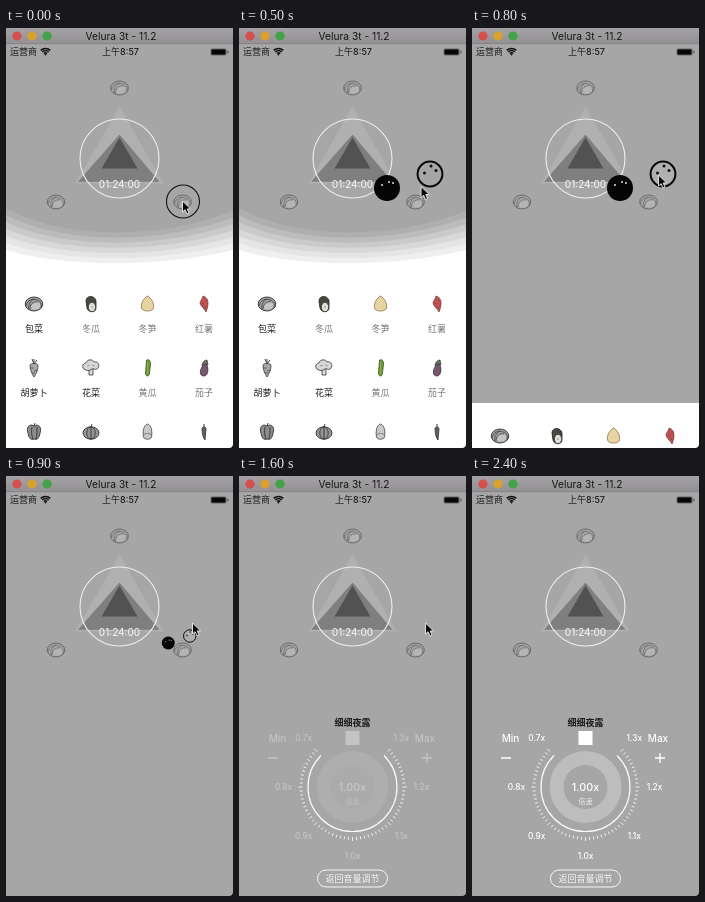
Write an HTML page with a canvas that moves like this. It is 227x420 px and loops after 2500 ms.

```html
<!DOCTYPE html>
<html lang="zh-CN">
<head>
<meta charset="utf-8">
<style>
html, body { margin: 0; width: 100%; height: 100%; overflow: hidden; background: #a6a6a6; }
canvas { display: block; width: 227px; height: 420px; }
</style>
</head>
<body>
<canvas id="stage"></canvas>
<script>
const W = 227, H = 420, LOOP = 2500, STEP = 100;
const BG = '#a6a6a6', INK = '#1c1c1c';
const FONT = 'Inter, "Noto Sans CJK SC", "Noto Sans CJK", sans-serif';
const cv = document.getElementById('stage');
const dpr = window.devicePixelRatio || 1;
cv.width = W * dpr;
cv.height = H * dpr;
const c = cv.getContext('2d');

const ramp = (t, a, b) => Math.min(1, Math.max(0, (t - a) / (b - a)));
const easeOut = p => 1 - (1 - p) ** 2;
const mix = (a, b, p) => a + (b - a) * p;
const rad = deg => deg * Math.PI / 180;

function paint(fill, stroke, w = 1) {
  if (fill) { c.fillStyle = fill; c.fill(); }
  if (stroke) { c.strokeStyle = stroke; c.lineWidth = w; c.stroke(); }
}
function disc(x, y, r, fill, stroke, w) {
  c.beginPath();
  c.arc(x, y, r, 0, Math.PI * 2);
  paint(fill, stroke, w);
}
function oval(x, y, rx, ry, fill, stroke, w) {
  c.beginPath();
  c.ellipse(x, y, rx, ry, 0, 0, Math.PI * 2);
  paint(fill, stroke, w);
}
function pill(x, y, w, h, r, fill, stroke, line) {
  c.beginPath();
  c.roundRect(x, y, w, h, r);
  paint(fill, stroke, line);
}
function shape(d, fill, stroke, w) {
  const p = new Path2D(d);
  if (fill) { c.fillStyle = fill; c.fill(p); }
  if (stroke) { c.strokeStyle = stroke; c.lineWidth = w || 1; c.stroke(p); }
}
function text(s, x, y, size, color, weight = 400, align = 'center') {
  c.font = `${weight} ${size}px ${FONT}`;
  c.textAlign = align;
  c.textBaseline = 'alphabetic';
  c.fillStyle = color;
  c.fillText(s, x, y + size * 0.36);
}
function at(x, y, draw) {
  c.save();
  c.translate(x, y);
  draw();
  c.restore();
}
function faded(alpha, draw) {
  if (alpha <= 0) return;
  c.save();
  c.globalAlpha = alpha;
  draw();
  c.restore();
}

// Vegetables, each drawn around its own centre
function cabbage(fill = '#a0a0a0', line = '#333', light = '#c4c4c4') {
  oval(0, 0, 8.8, 7, fill, line, 0.9);
  shape('M-3 4C-3 0 0-3 4-2C7-1 7 3 4 5C1 6-2 6-3 4Z', light);
  shape('M-8 2C-7-4-1-6 3-4C7-3 8 1 7 4M-4 5C-4 0 0-3 4-2M0-5C-4-3-6 1-5 5', null, line, 0.7);
}
function waxGourd() {
  shape('M-5-3C-5-9 4-9 5-3L5 4C5 9-3 9-4 4Z', '#45483f', '#222', 0.8);
  oval(1, 3, 3.6, 4.6, '#e2e2d8', '#333', 0.7);
  disc(1, 3, 1.2, '#b9bcae');
}
function bamboo() {
  shape('M0-8C4-6 7 0 6 4C5 8-5 8-6 4C-7 0-4-6 0-8Z', '#e8d3a2', '#8a744b', 0.8);
}
function sweetPotato() {
  shape('M-1-8C2-7 4-5 4-1C4 3 3 5 2 8C1 5-3 3-4-1C-4-3-2-4-1-8Z', '#bf5352', '#743333', 0.7);
  shape('M-2-1L0 0M1-4L3-3M0 3L2 3', null, '#823c3c', 0.6);
}
function carrot() {
  shape('M0-4L-2-9M0-4L0-9M0-4L3-8', null, '#444', 1);
  shape('M-4-3C-3-5 3-5 4-3C4 2 2 6 0 9C-2 6-4 2-4-3Z', '#aaa', '#333', 0.8);
  shape('M-4 0L0 0M4 2L0 3M-2 5L1 5', null, '#444', 0.7);
}
function cauliflower() {
  shape('M-2 0L-2 7L2 7L2 0Z', '#ddd', '#333', 0.8);
  shape('M-7 1C-10-2-7-5-5-5C-4-9 2-9 3-6C7-7 9-3 7 0C5 3 3 0 1 1C-2 3-4 3-7 1Z', '#d6d6d6', '#333', 0.8);
  shape('M-4-2L-1-3M1-3L4-2', null, '#777', 0.6);
}
function cucumber() {
  shape('M-1-8C2-9 3-7 3-4L2 5C2 9-2 9-2 5Z', '#6d9a39', '#38591e', 0.8);
  shape('M0-6L0 6', null, '#94ba58', 0.7);
}
function eggplant() {
  shape('M1-5C5-3 5 8 0 8C-5 8-4 2-2-1Z', '#75596a', '#3b2c36', 0.8);
  shape('M-2-2C-2-6 1-8 3-8L4-3L1-4Z', '#69705d', '#333', 0.7);
}
function pepper() {
  shape('M0-6C5-9 8-4 6 1C5 7 3 8 0 7C-3 8-5 7-6 1C-8-4-5-9 0-6Z', '#8c8c8c', '#333', 0.9);
  shape('M0-6L1-9M-2-5C-3 0-2 5-1 7M3-5C3 0 3 4 2 7', null, '#333', 0.9);
}
function pumpkin() {
  oval(0, 1, 8, 6.2, '#959595', '#333', 0.9);
  oval(0, 1, 4.2, 6.2, null, '#333', 0.8);
  shape('M0-5L0 7M0-5L1-8', null, '#333', 0.9);
}
function radish() {
  shape('M0-8C4-7 5 0 4 5C3 8-3 8-4 5C-5 0-4-7 0-8Z', '#c9c9c9', '#444', 0.8);
  shape('M-4 3C-2 1 2 1 4 3', null, '#555', 0.7);
}
function chili() {
  shape('M0-8L0-5', null, '#333', 1);
  shape('M-2-4C0-6 2-5 2-3L1 8C-1 6-2 1-2-4Z', '#626262', '#333', 0.8);
}

const COLS = [28, 85, 141.5, 198];
const ROWS = [
  [['包菜', cabbage, 1], ['冬瓜', waxGourd], ['冬笋', bamboo], ['红薯', sweetPotato]],
  [['胡萝卜', carrot, 1], ['花菜', cauliflower, 1], ['黄瓜', cucumber], ['茄子', eggplant]],
  [['', pepper], ['', pumpkin], ['', radish], ['', chili]]
];

function waves() {
  for (let i = 0; i < 7; i++) {
    const left = 180 + i * 7, right = 183 + i * 6.5, mid = 208 + i * 4.6;
    c.beginPath();
    c.moveTo(0, left);
    c.bezierCurveTo(55, mid + 3, 150, mid + 5, W, right);
    c.lineTo(W, 250);
    c.lineTo(0, 250);
    paint(i === 6 ? '#fff' : `rgba(255,255,255,${0.1 + i * 0.055})`);
  }
}

function list(t) {
  const dy = t < 800 ? 0 : 132;
  if (t < 800) waves();
  c.fillStyle = '#fff';
  c.fillRect(0, 243 + dy, W, H);
  ROWS.forEach((row, r) => row.forEach(([name, draw, on], k) => {
    const y = 276 + r * 64 + dy;
    at(COLS[k], y, () => draw());
    text(name, COLS[k], y + 25, 9, on ? INK : '#777');
  }));
}

function titleBar() {
  const g = c.createLinearGradient(0, 0, 0, 16);
  g.addColorStop(0, '#a5a2a5');
  g.addColorStop(1, '#939093');
  c.fillStyle = g;
  c.fillRect(0, 0, W, 16);
  c.fillStyle = '#7f7c7f';
  c.fillRect(0, 15.5, W, 0.6);
  ['#d3504e', '#d9a22e', '#43a347'].forEach((col, i) => disc(11 + i * 15, 8, 4.6, col));
  text('Velura 3t - 11.2', 115, 8.3, 10.2, '#161616');
}

function statusBar() {
  text('运营商', 4, 24, 9, INK, 400, 'left');
  text('上午8:57', 114.5, 24, 9, INK, 500);
  [2.4, 4.6, 6.8].forEach(r => {
    c.beginPath();
    c.arc(39.5, 27.2, r, rad(-135), rad(-45));
    paint(null, '#111', 1.5);
  });
  disc(39.5, 26.5, 0.9, '#111');
  pill(204.5, 20.5, 16, 7, 1.8, null, '#777', 0.7);
  pill(205.3, 21.3, 14.4, 5.4, 0.8, '#080808');
  c.fillStyle = '#555';
  c.fillRect(221.3, 22.7, 1.2, 2.7);
}

function timer() {
  shape('M113.5 78.5L157.5 155.3L69.5 155.3Z', '#b0b0b0');
  shape('M113.5 106.5L153.5 153.8L72 153.8Z', '#7f7f7f');
  shape('M113.5 109.5L131.5 140.5L95.5 140.5Z', '#525252');
  disc(113.5, 130.5, 39.5, null, '#eee', 1.1);
  text('01:24:00', 113.5, 156.7, 9.8, '#f0f0f0', 500);
  [[113.5, 60], [50, 174], [176.5, 174]].forEach(([x, y]) =>
    at(x, y, () => cabbage(BG, '#626262', '#b4b4b4')));
}

function balls(t) {
  const grow = easeOut(ramp(t, 0, 300)) * (1 - ramp(t, 800, 1000));
  if (!grow) return;
  const place = (x, y, draw) => at(mix(176.5, x, grow), mix(174, y, grow), () => {
    c.scale(grow, grow);
    draw();
  });
  place(148, 160, () => {
    disc(0, 0, 13, '#050505');
    [[-5, -3], [2, -6], [6, -5]].forEach(([x, y]) => disc(x, y, 1, '#ddd'));
  });
  place(191, 146, () => {
    disc(0, 0, 12.4, t >= 700 ? '#b0b0b0' : BG, '#080808', 2);
    [[-5.5, -1], [1, -8], [6, -3.5]].forEach(([x, y]) => disc(x, y, 1.5, '#111'));
  });
}

function cursor(t) {
  if (t >= 1800) return;
  const p = easeOut(ramp(t, 400, 700));
  if (t < 500) disc(177, 173.5, 16.5, null, '#111', 1.1);
  at(mix(176.5, 186.5, p), mix(173, 147, p), () =>
    shape('M0 0L0 11L2.6 8.7L4.5 13L6.5 12L4.7 8L8 7.8Z', '#080808', '#eee', 0.9));
}

// Angles are measured from the bottom of the dial
function dial(t) {
  const X = 113.5, Y = 311;
  const polar = (r, deg) => [X + r * Math.sin(rad(deg)), Y + r * Math.cos(rad(deg))];

  faded(ramp(t, 1000, 1450), () => {
    const a = rad(135 * ramp(t, 1000, 1500));
    c.beginPath();
    c.arc(X, Y, 44.5, Math.PI / 2 - a, Math.PI / 2 + a);
    paint(null, '#fafafa', 1.2);
  });

  const reach = 135 * ramp(t, 1200, 1600);
  if (reach) for (let d = -135; d <= 135; d += 4.5) {
    if (Math.abs(d) > reach) continue;
    c.beginPath();
    c.moveTo(...polar(50, d));
    c.lineTo(...polar(d % 45 ? 53 : 54, d));
    paint(null, '#f5f5f5', 0.9);
  }

  faded(ramp(t, 1500, 1800), () => {
    disc(X, Y, 36, '#bdbdbd');
    disc(X, Y, 22, BG);
    text('1.00x', X, Y, 10.8, '#fff', 500);
    text('倍速', X, 325, 7, '#eee');
    c.fillStyle = '#fff';
    c.fillRect(106.5, 255, 14, 14);
    for (let i = -3; i <= 3; i++) {
      const [x, y] = polar(69, i * 45);
      text((1 + i * 0.1).toFixed(1) + 'x', x, y, 8.3, '#fff', 500);
    }
    text('Min', 38.5, 262, 10, '#fff', 500);
    text('Max', 186, 262, 10, '#fff', 500);
    shape('M29 282L39 282M183 282L193 282M188 277L188 287', null, '#fff', 1.3);
  });
}

function footer(t) {
  faded(ramp(t, 900, 1200), () => {
    text('细细夜露', 113.5, 246.7, 9, INK, 600);
    pill(78.5, 394, 70, 17, 8.5, null, '#f5f5f5', 1);
    text('返回音量调节', 113.5, 402.7, 9, '#f5f5f5', 500);
  });
}

function render(t) {
  c.setTransform(dpr, 0, 0, dpr, 0, 0);
  c.fillStyle = BG;
  c.fillRect(0, 0, W, H);
  if (t < 900) list(t);
  titleBar();
  statusBar();
  timer();
  balls(t);
  dial(t);
  footer(t);
  cursor(t);
  // rounded window corner
  shape('M227 416Q227 420 223 420L227 420Z', '#000');
}

const start = performance.now();
function tick() {
  const t = (performance.now() - start) % LOOP;
  render(Math.floor(t / STEP) * STEP);
  requestAnimationFrame(tick);
}
tick();
</script>
</body>
</html>
```
